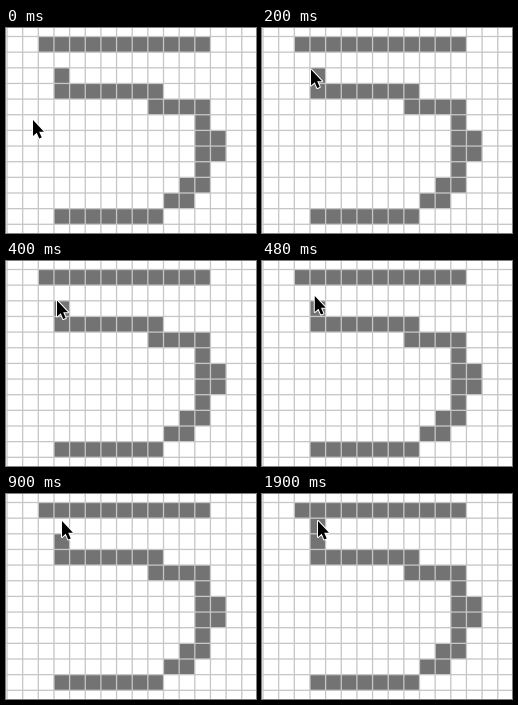
Animation of 250x205 px, one loop 2420 ms. Source, as an HTML page with a canvas:

```html
<!DOCTYPE html>
<html lang="en">
<head>
<meta charset="utf-8">
<title>Grid drawing</title>
<style>
html, body { margin: 0; width: 100%; height: 100%; overflow: hidden; background: #fff; }
canvas { display: block; }
</style>
</head>
<body>
<canvas id="stage" width="250" height="205"></canvas>
<script>
const ctx = document.getElementById('stage').getContext('2d');
const LOOP = 2420, CLICK = 1700, FIRST_MOVE = 30, MOVE_STEP = 41;
const PITCH = 15.65, LEFT = 1, TOP = 8.5, LINE = 1.3;

// Paths through cell centres, one cell wide
const wall = new Path2D('M2 0H12 M3 2V3H9V4H12V9H11V10H10 M13 6V7 M3 11H9');
const gap = new Path2D('M3 1V1.001');
const arrow = new Path2D('M0 0V16L3.7 12.7 6.2 18.5 8.7 17.5 6.2 11.7H11Z');

const stops = [
  { t: 0, x: 27, y: 92 },
  { t: 194, x: 49, y: 41.5 },
  { t: 399, x: 51, y: 39.5 },
  { t: 604, x: 56, y: 27 }
];

const mix = (a, b, p) => a + (b - a) * p;
const smooth = p => p * p * (3 - 2 * p);

function drawCells(filled) {
  ctx.save();
  ctx.translate(LEFT + PITCH / 2, TOP + PITCH / 2);
  ctx.scale(PITCH, PITCH);
  ctx.lineWidth = 1;
  ctx.lineCap = 'square';
  ctx.strokeStyle = '#737373';
  ctx.stroke(wall);
  if (filled) ctx.stroke(gap);
  ctx.restore();
}

function drawGrid() {
  ctx.fillStyle = '#c6c6c6';
  for (let x = LEFT; x < 250; x += PITCH) ctx.fillRect(x - LINE / 2, 0, LINE, 205);
  for (let y = TOP; y < 205; y += PITCH) ctx.fillRect(0, y - LINE / 2, 250, LINE);
}

function cursorAt(time) {
  const step = Math.floor((time - FIRST_MOVE) / MOVE_STEP);
  const t = step < 0 ? 0 : FIRST_MOVE + step * MOVE_STEP;
  const next = stops.findIndex(stop => stop.t > t);
  if (next < 0) return stops.at(-1);
  const from = stops[next - 1], to = stops[next];
  const p = smooth((t - from.t) / (to.t - from.t));
  return { x: mix(from.x, to.x, p), y: mix(from.y, to.y, p) };
}

function drawCursor({ x, y }) {
  ctx.save();
  ctx.translate(x, y);
  ctx.lineJoin = 'round';
  ctx.lineWidth = 2;
  ctx.strokeStyle = '#fff';
  ctx.stroke(arrow);
  ctx.fillStyle = '#000';
  ctx.fill(arrow);
  ctx.restore();
}

function draw() {
  const time = performance.now() % LOOP;
  ctx.fillStyle = '#fff';
  ctx.fillRect(0, 0, 250, 205);
  drawCells(time >= CLICK);
  drawGrid();
  drawCursor(cursorAt(time));
  requestAnimationFrame(draw);
}

draw();
</script>
</body>
</html>
```
